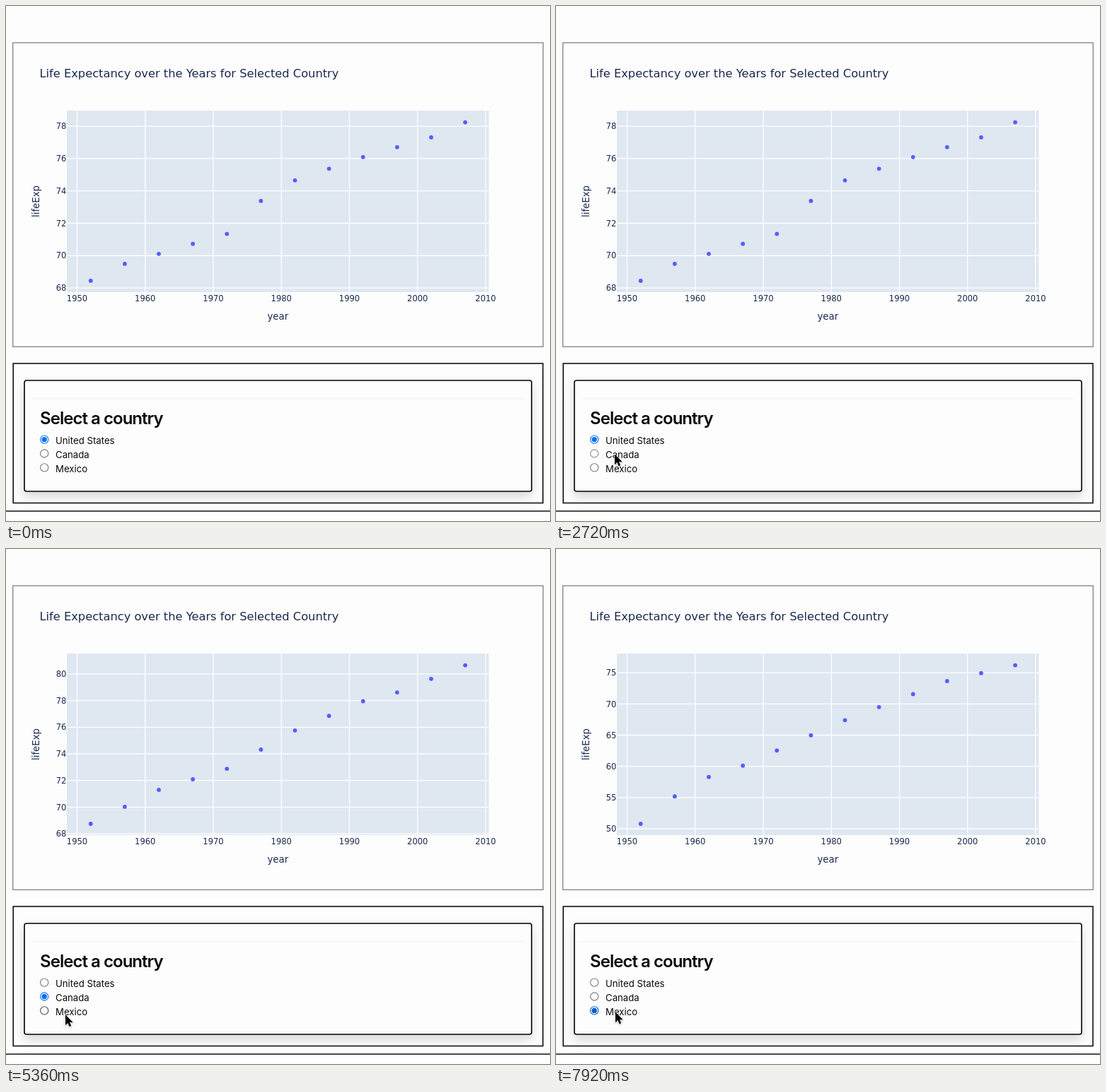
An HTML page for the animation above (8000 ms loop, 769x729 px).

```html
<!DOCTYPE html>
<html lang="en">
<head>
<meta charset="utf-8">
<title>Life expectancy</title>
<style>
  html, body { margin: 0; width: 100%; height: 100%; overflow: hidden; background: #fdfdfd; }
  svg { display: block; width: 769px; height: 729px; }
  .plot { font-family: "DejaVu Sans", sans-serif; fill: #1a2a50; }
  .tick { font-size: 11.5px; }
  .axis { font-size: 13.3px; text-anchor: middle; }
  .grid { stroke: #fff; stroke-width: 1.3; }
  .form { font-family: Inter, sans-serif; font-size: 13.2px; fill: #08090a; }
  .card { filter: drop-shadow(0 7px 7px rgba(0, 0, 0, .15)); }
</style>
</head>
<body>
<svg viewBox="0 0 769 729">
  <rect x="9.75" y="52" width="749.5" height="430.3" fill="none" stroke="#777" stroke-width="1.2"/>
  <g class="plot">
    <text x="47.5" y="100.5" font-size="16.25">Life Expectancy over the Years for Selected Country</text>
    <rect x="86" y="148" width="596.5" height="257" fill="#dfe7f1"/>
    <g id="years"></g>
    <g id="charts"></g>
    <text class="axis" x="384.3" y="444">year</text>
    <text class="axis" transform="translate(46.5 276.5) rotate(-90)">lifeExp</text>
  </g>
  <rect x="10.2" y="506" width="748.8" height="197.5" fill="#fdfdfd" stroke="#111" stroke-width="1.6"/>
  <rect class="card" x="26" y="530" width="717" height="157" rx="3" fill="#fdfdfd" stroke="#000" stroke-width="1.6"/>
  <path d="M36 556H733" stroke="#f1f1f1"/>
  <g class="form">
    <text x="48" y="592" font-size="24" font-weight="600" letter-spacing="-.04em">Select a country</text>
    <g id="radios"></g>
  </g>
  <path d="M0 715H769" stroke="#111" stroke-width="1.6"/>
  <path id="cursor" d="M0 0V16L3.7 12.6L6.1 18.2L8.9 17L6.5 11.6H11.6Z" fill="#000" stroke="#fff"
    stroke-width="1.2" paint-order="stroke" style="filter:drop-shadow(0 1px 1px rgba(0,0,0,.3))"/>
</svg>
<script>
const LOOP = 8000, SAMPLES = 12;
const PRESS = 100, REDRAW_DELAY = 120;
const clicks = [2780, 6560]; // each click selects the next country

// Bends of each curve: [sample, life expectancy], straight in between
const countries = [
  { name: "United States", tickStep: 2,
    bends: [[0, 68.44], [1, 69.49], [4, 71.34], [5, 73.38], [6, 74.65], [8, 76.09], [10, 77.31], [11, 78.24]] },
  { name: "Canada", tickStep: 2,
    bends: [[0, 68.75], [2, 71.3], [4, 72.88], [6, 75.76], [8, 77.95], [9, 78.61], [11, 80.65]] },
  { name: "Mexico", tickStep: 5,
    bends: [[0, 50.79], [1, 55.19], [2, 58.3], [3, 60.11], [6, 67.4], [9, 73.67], [11, 76.2]] }
];

// Cursor path: [time, x, y]
const path = [[440, -14, 676], [800, 77, 630.5], [1300, 83, 634.5],
  [5100, 83, 634.5], [5320, 84, 659.5], [5700, 84, 655.5]];

const linear = p => p;
const smooth = p => p * p * (3 - 2 * p);
const byId = id => document.getElementById(id);

// Values of a list of [key, ...values] at a key, held after the last one
function interpolate(points, key, ease) {
  const next = points.findIndex(point => point[0] > key);
  if (next < 0) return points[points.length - 1].slice(1);
  const from = points[next - 1], to = points[next];
  const p = ease((key - from[0]) / (to[0] - from[0]));
  return from.slice(1).map((value, i) => value + (to[i + 1] - value) * p);
}

function add(parent, tag, attrs, text) {
  const node = document.createElementNS("http://www.w3.org/2000/svg", tag);
  for (const key in attrs) node.setAttribute(key, attrs[key]);
  if (text !== undefined) node.textContent = text;
  return parent.appendChild(node);
}

const xOf = year => 100.5 + (year - 1950) * 9.625;

for (let year = 1950; year <= 2010; year += 10) {
  add(byId("years"), "path", { class: "grid", d: `M${xOf(year)} 148V405` });
  add(byId("years"), "text", { class: "tick", x: xOf(year), y: 417.5, "text-anchor": "middle" }, year);
}

const charts = countries.map(({ bends, tickStep }) => {
  const chart = add(byId("charts"), "g", {});
  const low = bends[0][1], high = bends[bends.length - 1][1];
  const yOf = value => 389 - (value - low) / (high - low) * 224.4;
  for (let tick = Math.floor(low / tickStep) * tickStep; tick <= high; tick += tickStep) {
    add(chart, "path", { class: "grid", d: `M86 ${yOf(tick)}H682.5` });
    add(chart, "text", { class: "tick", x: 85.3, y: yOf(tick) + 4.2, "text-anchor": "end" }, tick);
  }
  for (let i = 0; i < SAMPLES; i++) {
    const [life] = interpolate(bends, i, linear);
    add(chart, "circle", { cx: xOf(1952 + 5 * i), cy: yOf(life), r: 2.9, fill: "#555efa" });
  }
  return chart;
});

const radios = countries.map(({ name }, i) => {
  const cx = 54.2, cy = 613.6 + 19.9 * i;
  add(byId("radios"), "text", { x: 70, y: 620 + 20 * i }, name);
  return {
    ring: add(byId("radios"), "circle", { cx, cy, r: 5.6, fill: "#fff", "stroke-width": 1.1 }),
    dot: add(byId("radios"), "circle", { cx, cy, r: 3.7 })
  };
});

function ringColor(checked, hovered, pressed) {
  if (checked) return hovered ? "#005cc8" : "#0b70f5";
  if (pressed) return "#8d8d8d";
  return hovered ? "#4f4f4f" : "#767676";
}

function draw(t) {
  const clicksBy = time => clicks.filter(click => click <= time).length;
  const selected = clicksBy(t), shown = clicksBy(t - REDRAW_DELAY);
  const pressing = clicksBy(t + PRESS) > selected;
  const tip = t < path[0][0] ? null : interpolate(path, t, smooth);
  const hover = tip && tip[0] > 48 ? Math.floor((tip[1] - 605) / 20) : -1;

  charts.forEach((node, i) => node.style.display = i === shown ? "" : "none");
  radios.forEach(({ ring, dot }, i) => {
    const checked = i === selected, hovered = i === hover;
    const color = ringColor(checked, hovered, hovered && pressing);
    ring.setAttribute("stroke", color);
    dot.setAttribute("fill", checked ? color : "none");
  });
  byId("cursor").style.display = tip ? "" : "none";
  if (tip) byId("cursor").setAttribute("transform", `translate(${tip}) scale(.92)`);
}

const start = performance.now();
function frame() {
  draw((performance.now() - start) % LOOP);
  requestAnimationFrame(frame);
}
frame();
</script>
</body>
</html>
```
